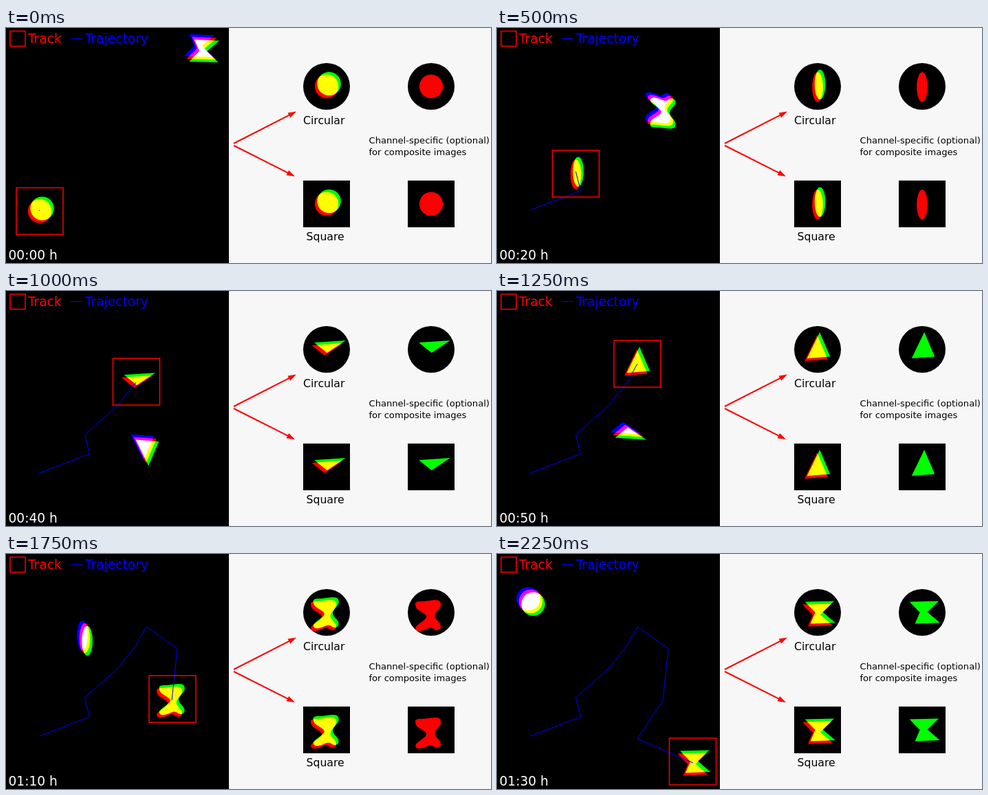
Animation, 705 px wide and 342 px high, one loop 2500 ms. Source, as an HTML page with a canvas:

```html
<!DOCTYPE html>
<html lang="en">
<head>
<meta charset="utf-8">
<title>Cell tracking</title>
<style>
html, body { margin: 0; width: 100%; height: 100%; overflow: hidden; background: #f7f7f7; }
canvas { display: block; width: 705px; height: 342px; }
</style>
</head>
<body>
<canvas id="stage" width="705" height="342"></canvas>
<script>
const ctx = document.getElementById('stage').getContext('2d');
const STEP = 250, HALF = 34, MIRROR = 335.5;
const RED = '#f00', GREEN = '#0f0', BLUE = '#00f';

const ellipse = (rx, ry, x = 0, y = 0) => () => ctx.ellipse(x, y, rx, ry, 0, 0, Math.PI * 2);

const poly = (...p) => () => {
  for (let i = 0; i < p.length; i += 2) ctx.lineTo(p[i], p[i + 1]);
};

// Closed curve through the midpoints of a control polygon
const blob = (...p) => () => {
  const n = p.length;
  for (let i = 0; i <= n; i += 2) {
    const x = p[i % n], y = p[(i + 1) % n];
    const mx = (x + p[(i + 2) % n]) / 2, my = (y + p[(i + 3) % n]) / 2;
    if (i) ctx.quadraticCurveTo(x, y, mx, my);
    else ctx.moveTo(mx, my);
  }
};

// One entry per time step: box centre, track point, cropped channel, outline
const cells = [
  { c: [49, 266.5], p: [48.5, 265], ch: RED, path: ellipse(17.2, 17.2) },
  { c: [120.5, 237], p: [121.5, 237], ch: RED, path: ellipse(20, 14) },
  { c: [114.5, 212], p: [114.5, 209], ch: RED, path: ellipse(7.8, 21.7, 0, 1) },
  { c: [160, 168], p: [162, 167], ch: GREEN, path: ellipse(30, 7.7, -1, 2) },
  { c: [189.5, 132], p: [189, 133], ch: GREEN, path: poly(-3, 9, -21.5, -6, 24, -9) },
  { c: [204, 106], p: [204, 106], ch: GREEN, path: poly(-0.5, -21, -18.8, 17, 14.7, 14.5) },
  { c: [248.5, 140], p: [249, 138], ch: RED, path: blob(
    -18, -18, -15, -18, 13, -15, 18, -14, 20, -4, 20, 10, 19, 21, 15, 26, 7, 26,
    3, 22, 3, 15, -3, 10, -9, 8, -21, 9, -27, 5, -24, -2) },
  { c: [242, 211], p: [241, 213], ch: RED, path: blob(
    -23, -9, -23, -16, -10, -16, 5, -18.5, 13, -17, 15, -9, 6, 1, 5, 8, 14, 17, 14, 24,
    7, 27, 0, 21, -10, 26, -21, 28, -24, 21, -8, 10, -6, 4, -20, -4) },
  { c: [204, 268], p: [204, 269], ch: GREEN, path: poly(-22, -14, 27, -12, 6, 4, 22, 18, -20, 22, -8, 4) },
  { c: [284.5, 302], p: [285, 304], ch: GREEN, path: poly(
    -22, -11.5, 20.5, -12.5, 4, 3.5, 22, 19, -14, 20.5, -7, 4) }
];

function drawCell(cell, x, y, flip, channels) {
  for (const ch of channels) {
    const shift = ch === GREEN ? 1 : ch === BLUE ? -1 : 0;
    ctx.save();
    ctx.globalCompositeOperation = 'lighter';
    ctx.translate(x + shift * 3.6, y - shift * 3.9 * flip);
    ctx.scale(1, flip);
    ctx.beginPath();
    cell.path();
    ctx.fillStyle = ch;
    ctx.fill();
    ctx.restore();
  }
}

function drawCrop(cell, x, y, round, channels) {
  ctx.save();
  ctx.beginPath();
  if (round) ctx.arc(x, y, HALF, 0, Math.PI * 2);
  else ctx.rect(x - HALF, y - HALF, HALF * 2, HALF * 2);
  ctx.fillStyle = '#000';
  ctx.fill();
  ctx.clip();
  drawCell(cell, x, y, 1, channels);
  ctx.restore();
}

function text(str, x, y, size, color) {
  ctx.font = size + 'px "DejaVu Sans", sans-serif';
  ctx.fillStyle = color;
  ctx.fillText(str, x, y);
}

function line(points, color, width) {
  ctx.beginPath();
  for (const [x, y] of points) ctx.lineTo(x, y);
  ctx.strokeStyle = color;
  ctx.lineWidth = width;
  ctx.stroke();
}

function box(x, y, size) {
  ctx.strokeStyle = RED;
  ctx.lineWidth = 1.5;
  ctx.strokeRect(x, y, size, size);
}

function arrow(x0, y0, x1, y1) {
  const len = Math.hypot(x1 - x0, y1 - y0);
  ctx.save();
  ctx.translate(x0, y0);
  ctx.rotate(Math.atan2(y1 - y0, x1 - x0));
  line([[0, 0], [len - 9, 0]], RED, 2);
  ctx.beginPath();
  poly(len, 0, len - 12, -4, len - 12, 4)();
  ctx.fillStyle = RED;
  ctx.fill();
  ctx.restore();
}

function drawField(step) {
  ctx.fillStyle = '#000';
  ctx.fillRect(0, 0, 324, 342);

  const cell = cells[step], [x, y] = cell.c;
  const other = cells[cells.length - 1 - step];
  drawCell(other, other.c[0], MIRROR - other.c[1], -1, [RED, GREEN, BLUE]);
  drawCell(cell, x, y, 1, [RED, GREEN]);

  if (step) {
    line(cells.slice(0, step + 1).map(c => c.p), BLUE, 1);
  } else {
    ctx.fillStyle = BLUE;
    ctx.fillRect(48, 265, 1, 1);
  }
  box(x - HALF, y - HALF, HALF * 2);

  box(6, 4.5, 22);
  text('Track', 32, 21.5, 18.6, RED);
  line([[94, 15.5], [111, 15.5]], BLUE, 1);
  text('Trajectory', 115, 21.5, 18.6, BLUE);
  const hours = Math.floor(step / 6), tens = step % 6;
  text(`0${hours}:${tens}0 h`, 3.5, 337, 18.6, '#fff');
}

function drawPanel(step) {
  ctx.fillStyle = '#f7f7f7';
  ctx.fillRect(324, 0, 381, 342);
  arrow(331, 168, 422, 121.5);
  arrow(331, 171, 420, 216);

  const cell = cells[step];
  for (const [y, round] of [[85, true], [256, false]]) {
    drawCrop(cell, 466, y, round, [RED, GREEN]);
    drawCrop(cell, 618, y, round, [cell.ch]);
  }
  text('Circular', 432, 140, 15.7, '#000');
  text('Square', 436.5, 309, 15.7, '#000');
  text('Channel-specific (optional)', 527.5, 168, 13.1, '#000');
  text('for composite images', 527.5, 185, 13.1, '#000');
}

function frame() {
  const step = Math.floor(performance.now() / STEP) % cells.length;
  drawField(step);
  drawPanel(step);
  requestAnimationFrame(frame);
}
frame();
</script>
</body>
</html>
```
